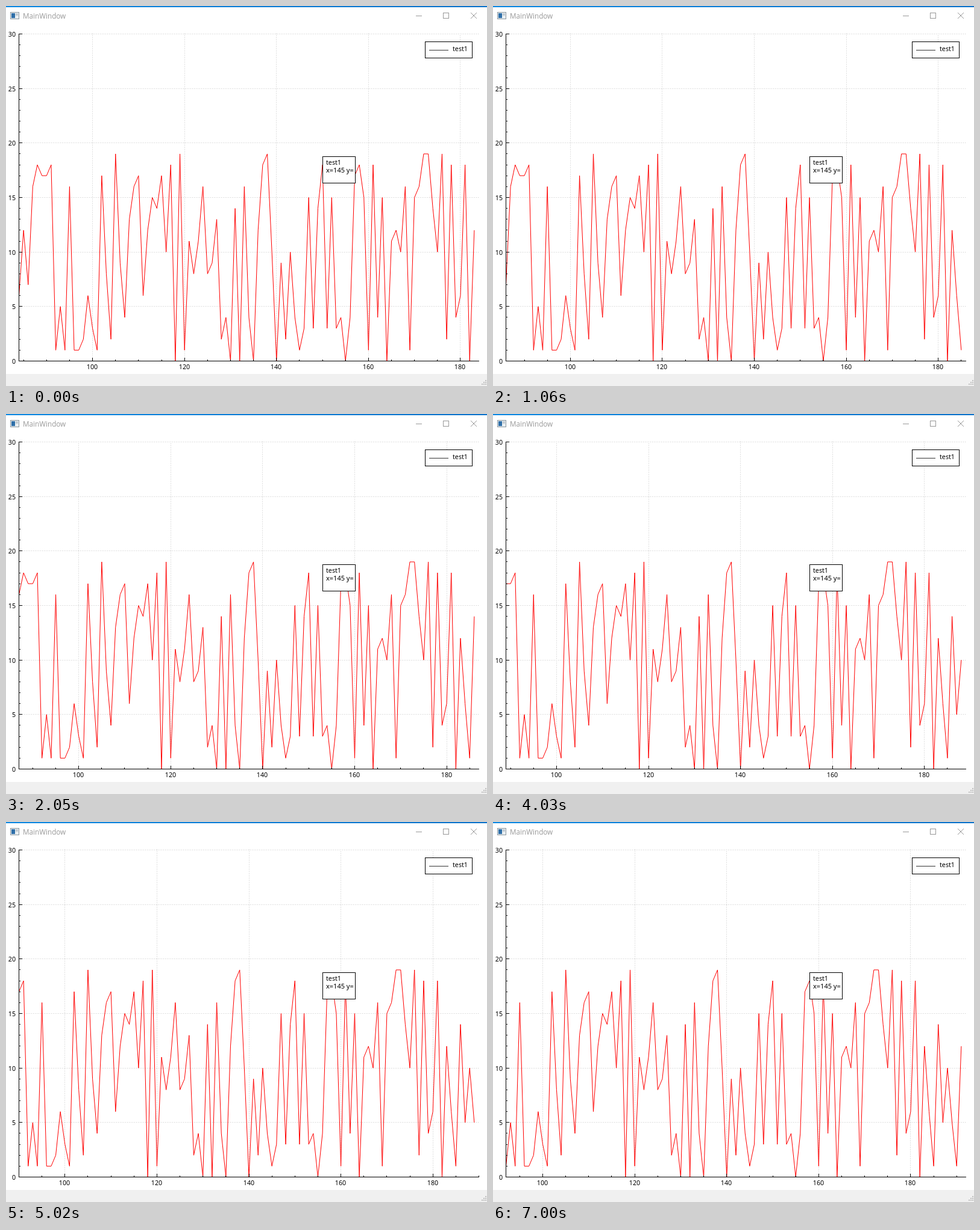
An HTML page with a canvas that plays this animation: 798x632 px, repeating every 7.99 s.

```html
<!DOCTYPE html>
<html lang="en">
<head>
<meta charset="utf-8">
<title>MainWindow</title>
<style>
  html, body { margin: 0; width: 100%; height: 100%; overflow: hidden; background: #fff; }
  canvas { display: block; }
</style>
</head>
<body>
<canvas id="stage" width="798" height="632"></canvas>
<script>
const ctx = document.getElementById('stage').getContext('2d');

const LOOP = 7990, FIRST_HOLD = 70, STEP = 990;
const plot = { left: 21, top: 46, right: 784, bottom: 590, span: 100, maxY: 30 };
const FIRST_X = 84;
const samples = [
  6, 12, 7, 16, 18, 17, 17, 18, 1, 5, 1, 16, 1, 1, 2, 6,
  3, 1, 17, 8, 2, 19, 9, 4, 13, 16, 17, 6, 12, 15, 14, 17, 10, 18, 0, 19,
  1, 11, 8, 11, 16, 8, 9, 13, 2, 4, 0, 14, 0, 16, 4, 0, 12, 18, 19, 10,
  0, 9, 2, 10, 4, 1, 3, 15, 3, 14, 18, 3, 15, 3, 4, 0, 4, 17, 18, 15,
  1, 18, 4, 15, 0, 11, 12, 10, 16, 1, 15, 16, 19, 19, 14, 10, 19, 2, 18, 4,
  6, 18, 0, 12, 6, 1, 14, 5, 10, 5, 1, 12
];

const toX = (x, start) => plot.left + (x - start) * (plot.right - plot.left) / plot.span;
const toY = y => plot.bottom - y * (plot.bottom - plot.top) / plot.maxY;

function rect(x, y, w, h, color) {
  ctx.fillStyle = color;
  ctx.fillRect(x, y, w, h);
}

function frame(x, y, w, h, color, fill) {
  rect(x, y, w, h, fill);
  ctx.strokeStyle = color;
  ctx.strokeRect(x + 0.5, y + 0.5, w - 1, h - 1);
}

function line(x1, y1, x2, y2, color, dash = []) {
  ctx.strokeStyle = color;
  ctx.setLineDash(dash);
  ctx.beginPath();
  ctx.moveTo(x1, y1);
  ctx.lineTo(x2, y2);
  ctx.stroke();
  ctx.setLineDash([]);
}

function text(str, x, y, size = 11, align = 'left', color = '#000', family = 'Noto Sans') {
  ctx.font = `${size}px "${family}", sans-serif`;
  ctx.textAlign = align;
  ctx.fillStyle = color;
  ctx.fillText(str, x, y);
}

function drawWindow() {
  rect(0, 0, 798, 632, '#fff');
  const accent = ctx.createLinearGradient(0, 0, 798, 0);
  accent.addColorStop(0, '#0a88e2');
  accent.addColorStop(1, '#0672ca');
  rect(0, 0, 798, 2, accent);

  frame(7, 10, 15, 12, '#8b979f', '#e9eef1');
  rect(9, 12, 6, 8, '#2f6fa8');
  rect(16, 12, 4, 4, '#c3ccd2');
  text('MainWindow', 28, 21, 11.7, 'left', '#999', 'Open Sans');

  const gray = '#999';
  rect(680, 16, 10, 1, gray);
  frame(725, 11, 10, 10, gray, '#fff');
  line(771, 11, 781, 21, gray);
  line(781, 11, 771, 21, gray);

  rect(0, 612, 798, 20, '#f0f0f0');
  for (let row = 0; row < 3; row++)
    for (let col = 0; col <= row; col++)
      rect(795 - col * 3, 622 + row * 3, 2, 2, '#bfbfbf');
}

function drawGrid(start) {
  const color = '#c8c8c8', dots = [1, 2];
  for (let y = 5; y <= plot.maxY; y += 5) {
    const py = Math.round(toY(y)) + 0.5;
    line(plot.left, py, plot.right + 1, py, color, dots);
  }
  for (let x = 100; x <= start + plot.span; x += 20) {
    const px = Math.round(toX(x, start)) + 0.5;
    line(px, plot.bottom, px, plot.top, color, dots);
  }
}

function drawCurve(start) {
  ctx.save();
  ctx.beginPath();
  ctx.rect(plot.left, plot.top, plot.right - plot.left + 1, plot.bottom - plot.top + 1);
  ctx.clip();
  ctx.strokeStyle = '#f00';
  ctx.lineJoin = 'bevel';
  ctx.beginPath();
  for (let x = start; x < start + plot.span; x++)
    ctx.lineTo(toX(x, start) + 0.5, toY(samples[x - FIRST_X]) + 0.5);
  ctx.stroke();
  ctx.restore();
}

function drawAxes(start) {
  const { left, top, right, bottom } = plot;
  rect(left, top, 1, bottom - top + 1, '#000');
  rect(left, bottom, right - left + 1, 1, '#000');
  for (let y = 0; y <= plot.maxY; y++) {
    const py = Math.round(toY(y)), major = y % 5 === 0;
    rect(left, py, major ? 6 : 3, 1, '#000');
    if (major) text(y, 16, py + 5, 10.7, 'right');
  }
  for (let x = Math.ceil(start / 5) * 5; x <= start + plot.span; x += 5) {
    const px = Math.round(toX(x, start)), major = x % 20 === 0;
    const size = major ? 6 : 3;
    rect(px, bottom - size + 1, 1, size, '#000');
    if (major) text(x, px, 604, 10.7, 'center');
  }
}

function drawBoxes() {
  frame(695, 59, 79, 28, '#000', '#fff');
  rect(702, 73, 32, 1, '#333');
  text('test1', 741, 75, 10.7);

  frame(525, 250, 55, 45, '#000', '#fff');
  text('test1', 531, 264, 10.7);
  text('x=145 y=', 531, 277);
}

function render() {
  const t = performance.now() % LOOP;
  const shift = t < FIRST_HOLD ? 0 : 1 + Math.floor((t - FIRST_HOLD) / STEP);
  const start = FIRST_X + shift;
  ctx.lineWidth = 1;
  drawWindow();
  drawGrid(start);
  drawCurve(start);
  drawAxes(start);
  drawBoxes();
  requestAnimationFrame(render);
}

render();
</script>
</body>
</html>
```
